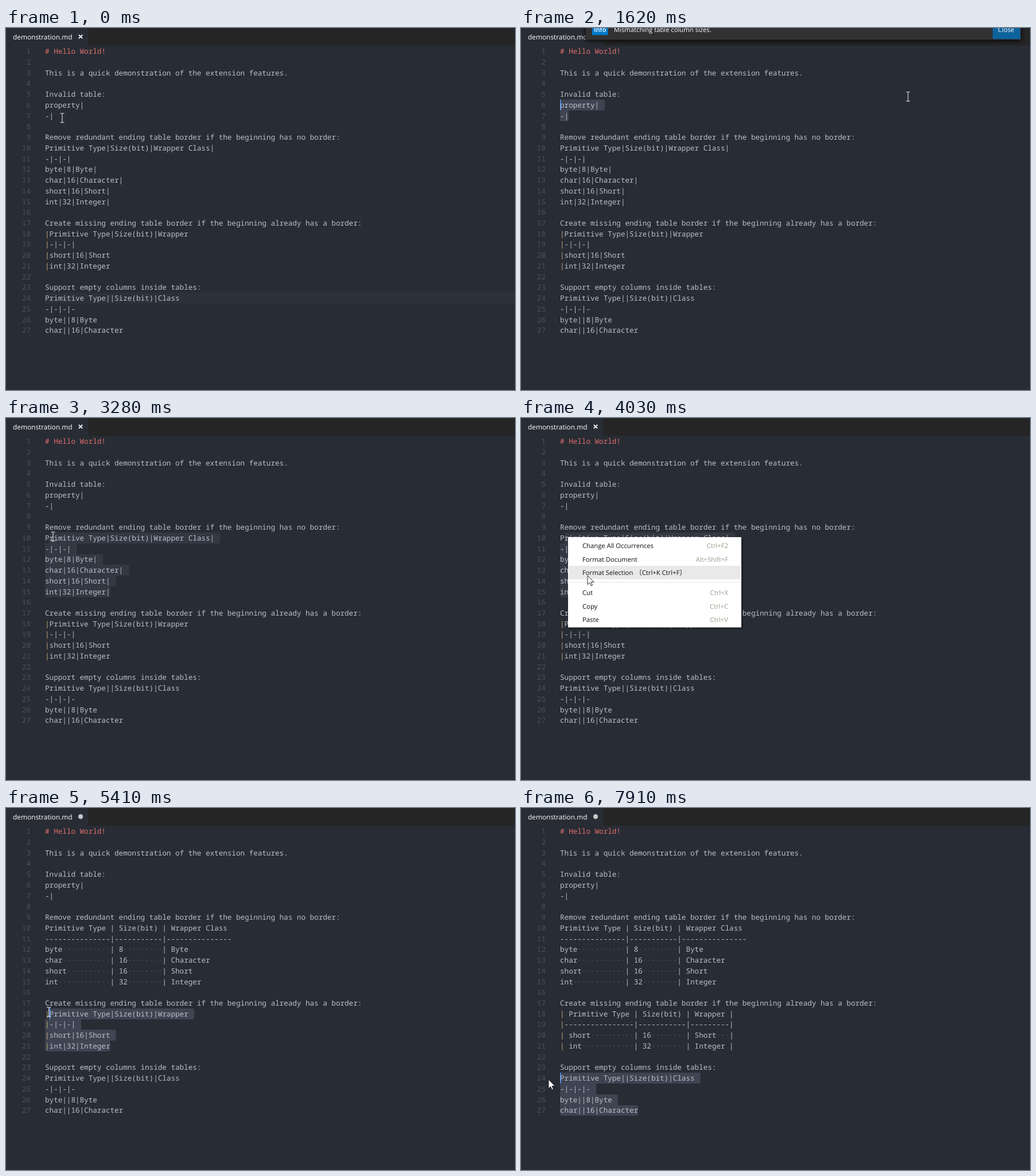
Recreate the animation shown at these times as an HTML page. Size 887 by 632 pixels, loop 8000 ms.

```html
<!DOCTYPE html>
<html lang="en">
<head>
<meta charset="utf-8">
<title>Table formatting demo</title>
<style>
  html, body { margin: 0; width: 100%; height: 100%; overflow: hidden; background: #282c34; }
  svg { display: block; width: 887px; height: 632px; text-rendering: geometricPrecision; }
  text { white-space: pre; }
  .code { font: 12.62px "Noto Sans Mono", monospace; fill: #bac1cd; }
  .num { fill: #495162; text-anchor: end; }
  .ui { font: 11.25px "Open Sans", "Noto Sans CJK JP", "Noto Sans CJK SC", sans-serif; }
  .key { fill: #9a9a8e; text-anchor: end; }
</style>
</head>
<body>
<svg viewBox="0 0 887 632">
  <defs>
    <filter id="shade" x="-10%" y="-50%" width="120%" height="200%">
      <feDropShadow dx="0" dy="2" stdDeviation="4" flood-color="#000" flood-opacity=".9"/>
    </filter>
    <filter id="drop" x="-5%" y="-5%" width="110%" height="110%">
      <feDropShadow dx="2" dy="2" stdDeviation="1.5" flood-color="#000" flood-opacity=".45"/>
    </filter>
  </defs>
  <rect width="887" height="632" fill="#282c34"/>
  <g id="marks"></g>
  <g id="lines" class="code"></g>
  <rect id="caret" width="1.6" height="19" fill="#5c97f5"/>
  <rect x="143.5" width="744" height="31" fill="#252526"/>
  <text x="12" y="19.5" class="ui" fill="#fff" style="font-size:11.86px">demonstration.md</text>
  <path id="cross" d="M126.8 11.8l6.4 6.4m0-6.4l-6.4 6.4" stroke="#fff" stroke-width="1.9"/>
  <circle id="dirty" cx="130" cy="15" r="4.2" fill="#c5c5c5"/>
  <g id="popup" class="ui" fill="#fff">
    <rect x="113" y="-20" width="758" height="53" fill="#333" filter="url(#shade)"/>
    <rect x="124" y="7" width="27.5" height="18" fill="#007acc"/>
    <text x="127" y="20" font-weight="600">Info</text>
    <text x="162" y="20">Mismatching table column sizes.</text>
    <rect x="822" width="48" height="32" fill="#0e639c"/>
    <text x="831" y="20">Close</text>
  </g>
  <g id="menu" class="ui" fill="#111"></g>
  <path id="beam" d="M-3.5-8H-1Q0-8 0-7Q0-8 1-8H3.5M0-7V7M-3.5 8H-1Q0 8 0 7Q0 8 1 8H3.5" fill="none" stroke="#e4e4e4" stroke-width="1.1"/>
  <path id="arrow" d="M0 0V15.8L3.6 12.4L6 18L8.4 17L6.1 11.5H11Z" fill="#fff" stroke="#15171b" stroke-width=".9"/>
</svg>
<script>
const LOOP = 8000, LEFT = 68, TOP = 31.6, CHAR = 7.572, ROW = 18.73, ITEM = 23.5;
const el = Object.fromEntries([...document.querySelectorAll('[id]')].map(e => [e.id, e]));

const RAW = `# Hello World!

This is a quick demonstration of the extension features.

Invalid table:
property|
-|

Remove redundant ending table border if the beginning has no border:
Primitive Type|Size(bit)|Wrapper Class|
-|-|-|
byte|8|Byte|
char|16|Character|
short|16|Short|
int|32|Integer|

Create missing ending table border if the beginning already has a border:
|Primitive Type|Size(bit)|Wrapper
|-|-|-|
|short|16|Short
|int|32|Integer

Support empty columns inside tables:
Primitive Type||Size(bit)|Class
-|-|-|-
byte||8|Byte
char||16|Character`.split('\n');

const FORMATS = [
  { time: 4230, first: 10, last: 15, bordered: false },
  { time: 6800, first: 18, last: 21, bordered: true }
];
const ITEMS = ['Change All Occurrences/Ctrl+F2', 'Format Document/Alt+Shift+F', 'Format Selection/',
  'Cut/Ctrl+X', 'Copy/Ctrl+C', 'Paste/Ctrl+V'].map(s => s.split('/'));
const MATCHED = ['|', 'Integer', 'Character'];

// The script of pointer actions, in order of time
const glides = [], drags = [], menus = [];
const glide = (from, to, point) => glides.push({ from, to, point });

function drag(from, to, ...points) {
  const step = (to - from) / points.length;
  points.forEach((p, i) => glide(from + i * step, from + (i + 1) * step, p));
  drags.push({ from, to });
}

function pickFormat(from, close, corner, tip) {
  glide(from, from + 180, corner);
  glide(from + 350, from + 800, tip);
  menus.push({ from: from + 250, close, x: corner[0], y: corner[1] + 1 });
}

glide(50, 100, [82, 155]);
drag(100, 230, [76, 154], [68, 136]);
pickFormat(410, 1420, [73, 138], [102, 199]);
glide(1420, 1620, [674, 120]);
glide(1620, 1950, [846, 14]);
glide(2230, 2600, [183, 304]);
drag(2600, 2870, [174, 299], [72, 211]);
pickFormat(3100, 4130, [82, 207], [116, 275]);
glide(4130, 4870, [201, 418]);
drag(5050, 5560, [130, 416], [76, 356], [65, 357]);
pickFormat(5740, 6660, [80, 356], [109, 416]);
glide(6760, 7350, [208, 532]);
drag(7440, 7910, [135, 527], [48, 474]);

const clamp = (v, lo, hi) => Math.max(lo, Math.min(hi, v));
const progress = (t, from, to) => clamp((t - from) / (to - from), 0, 1);
const colX = col => LEFT + col * CHAR;
const rowY = row => Math.round(TOP + (row - 1) * ROW);
const show = (node, on) => { node.style.display = on ? '' : 'none'; };
const rect = (x, y, w, h, fill) => `<rect x="${x}" y="${y}" width="${w}" height="${h}" fill="${fill}"/>`;

function formatTable(rows, bordered) {
  const cells = rows.map(r => r.replace(/^\||\|$/g, '').split('|'));
  const widths = cells[0].map((_, i) => Math.max(...cells.map(c => c[i].length)));
  return cells.map((row, n) => {
    const rule = n === 1;
    const line = row.map((c, i) => rule ? '-'.repeat(widths[i] + 2) : ` ${c.padEnd(widths[i])} `).join('|');
    if (bordered) return `|${line}|`;
    return rule ? line.slice(1) : line.trim();
  });
}

function docAt(t) {
  const doc = RAW.slice();
  for (const { time, first, last, bordered } of FORMATS)
    if (t >= time) doc.splice(first - 1, last - first + 1, ...formatTable(doc.slice(first - 1, last), bordered));
  return doc;
}

function pointer(t) {
  let [x, y] = [98, 157];
  for (const { from, to, point } of glides) {
    const k = progress(t, from, to);
    x += (point[0] - x) * k;
    y += (point[1] - y) * k;
  }
  return [x, y];
}

function place(t, doc) {
  const [x, y] = pointer(t);
  const row = Math.floor((y - TOP) / ROW) + 1;
  return { row, col: clamp(Math.round((x - LEFT) / CHAR), 0, doc[row - 1].length) };
}

let shown = '';
function drawLines(doc) {
  const key = doc.join('\n');
  if (key === shown) return;
  shown = key;
  el.lines.innerHTML = doc.map((line, i) => {
    const y = (45.3 + i * ROW).toFixed(2);
    const body = line
      .replace(/ {2,}/g, s => `<tspan fill="#59616e">${'·'.repeat(s.length)}</tspan>`)
      .replace(/^\|/, '<tspan fill="#c8ac78">|</tspan>');
    const fill = i ? '' : ' style="fill:#e0706f"';
    return `<text class="num" x="43" y="${y}">${i + 1}</text><text x="${LEFT}" y="${y}"${fill}>${body}</text>`;
  }).join('');
}

// Rows are rounded only at corners that no neighbouring row covers
function selection(rows, fill) {
  const last = rows.length - 1;
  return rows.map(({ row, x0, x1 }, i) => {
    const y0 = rowY(row), y1 = rowY(row + 1);
    const r = on => on ? 3 : 0;
    const tl = r(!i), bl = r(i === last);
    const tr = r(!i || rows[i - 1].x1 < x1), br = r(i === last || rows[i + 1].x1 < x1);
    return `<path fill="${fill}" d="M${x0 + tl} ${y0}H${x1 - tr}Q${x1} ${y0} ${x1} ${y0 + tr}V${y1 - br}` +
      `Q${x1} ${y1} ${x1 - br} ${y1}H${x0 + bl}Q${x0} ${y1} ${x0} ${y1 - bl}V${y0 + tl}Q${x0} ${y0} ${x0 + tl} ${y0}Z"/>`;
  }).join('');
}

function matches(doc, word) {
  let out = '';
  doc.forEach((line, i) => {
    for (let c = line.indexOf(word); c >= 0; c = line.indexOf(word, c + word.length))
      out += rect(colX(c), rowY(i + 1), word.length * CHAR, 19, '#3a404a');
  });
  return out;
}

function drawMarks(t, doc) {
  const current = row => rect(67.5, rowY(row), 820, 19, '#2c323b');
  const now = drags.filter(d => t >= d.from).pop();
  if (!now) {
    el.marks.innerHTML = current(24);
    show(el.caret, false);
    return;
  }
  const start = place(now.from, doc), head = place(Math.min(t, now.to), doc);
  const endCol = doc[start.row - 1].length;   // every drag begins at a line end
  const away = menus.some(m => t >= m.from - 100 && t < m.close);
  const sameRow = head.row === start.row;
  if (sameRow && head.col === endCol) {
    el.marks.innerHTML = current(start.row);
  } else {
    const word = sameRow ? doc[head.row - 1].slice(head.col, endCol) : '';
    const rows = [];
    for (let row = head.row; row <= start.row; row++)
      rows.push({
        row,
        x0: colX(row === head.row ? head.col : 0),
        x1: colX(doc[row - 1].length) + (row < start.row ? 10 : 0)
      });
    el.marks.innerHTML = (MATCHED.includes(word) ? matches(doc, word) : '') +
      selection(rows, away ? '#333943' : '#3e4451');
  }
  const wake = Math.max(now.to, ...menus.map(m => m.close).filter(c => c <= t));
  show(el.caret, !away && (t < now.to || (t - wake) % 1000 < 500));
  el.caret.setAttribute('x', colX(head.col));
  el.caret.setAttribute('y', rowY(head.row));
}

function drawMenu(t, [px, py]) {
  const menu = menus.find(m => t >= m.from && t < m.close);
  show(el.menu, menu);
  if (!menu) return;
  let out = `<g filter="url(#drop)">${rect(0, 0, 302, 157.5, '#fff')}</g>`;
  ITEMS.forEach(([name, key], i) => {
    const top = 3 + i * ITEM + (i > 2 ? 11.5 : 0), over = py - menu.y - top;
    if (px > menu.x && over >= 0 && over < ITEM) out += rect(1, top, 300, ITEM, '#e9e9e9');
    out += `<text x="25" y="${top + 16}">${name}</text><text class="key" x="279" y="${top + 16}">${key}</text>`;
  });
  el.menu.innerHTML = out + '<text x="117.5" y="66">〔Ctrl+K Ctrl+F〕</text>' + rect(1, 78.5, 300, 1, '#e2e2e2');
  el.menu.setAttribute('transform', `translate(${menu.x} ${menu.y})`);
}

function drawPopup(t) {
  const y = -44 * Math.max((1 - progress(t, 1570, 1720)) ** 3, progress(t, 2230, 2330));
  show(el.popup, y > -44);
  el.popup.setAttribute('transform', `translate(0 ${y})`);
}

function drawPointer(t, [x, y]) {
  const onMenu = menus.some(m => t >= m.from && t < m.close + 60);
  const arrow = x < 60 || y < 31 || onMenu && !(t > 1500 && t < 1600);
  show(el.arrow, arrow);
  show(el.beam, !arrow);
  (arrow ? el.arrow : el.beam).setAttribute('transform', `translate(${x} ${y})`);
}

function draw(t) {
  const doc = docAt(t), at = pointer(t), dirty = t >= FORMATS[0].time;
  drawLines(doc);
  drawMarks(t, doc);
  drawPopup(t);
  drawMenu(t, at);
  drawPointer(t, at);
  show(el.dirty, dirty);
  show(el.cross, !dirty);
}

function tick() {
  draw(performance.now() % LOOP);
  requestAnimationFrame(tick);
}
tick();
</script>
</body>
</html>
```
